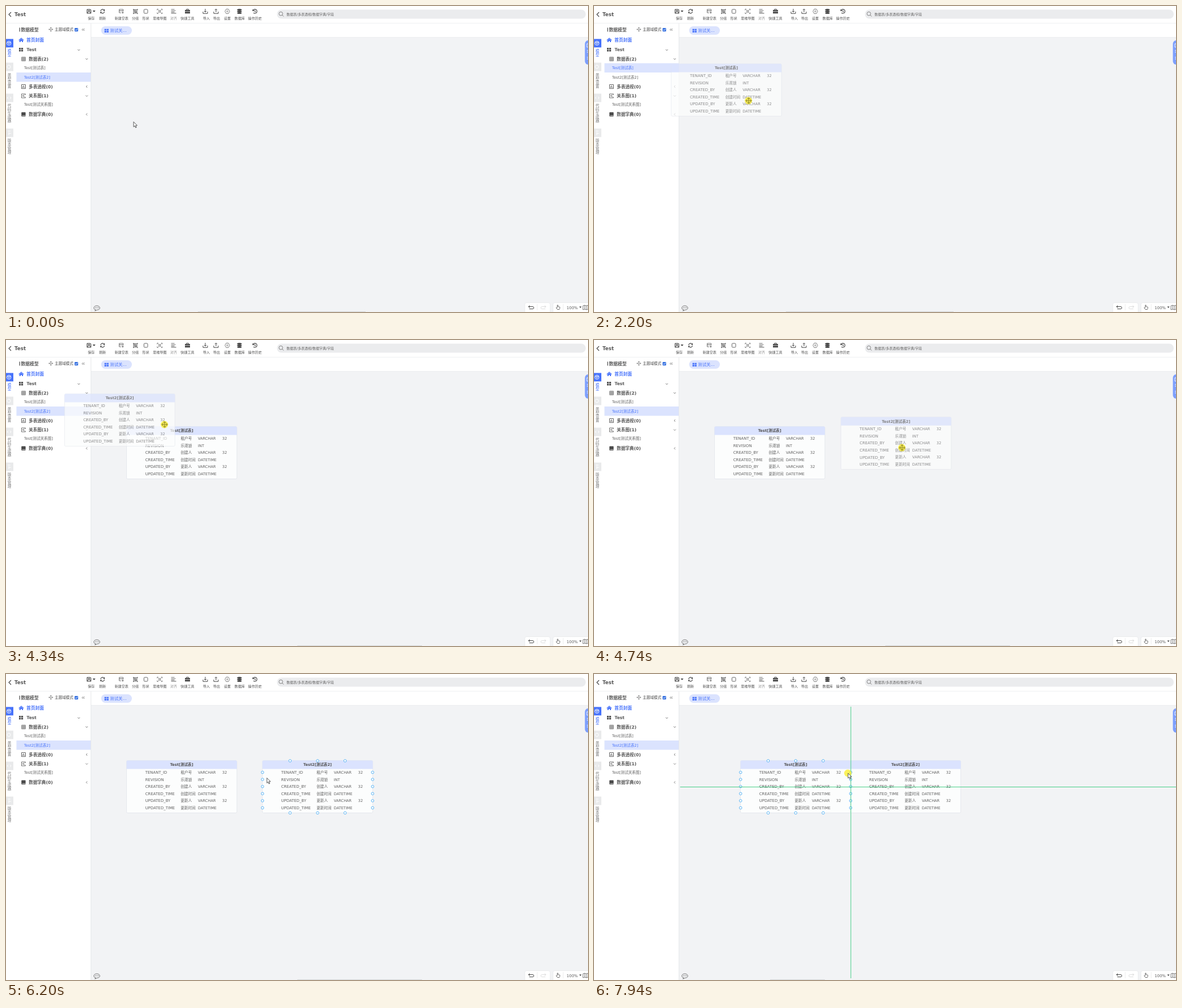
These frames come from a looping animation (1031 px wide and 543 px high, 8 s). An HTML page:

```html
<!DOCTYPE html>
<html lang="zh-CN">
<head>
<meta charset="utf-8">
<title>Data model editor</title>
<style>
html, body { margin: 0; width: 100%; height: 100%; overflow: hidden; background: #fff; }
svg { display: block; width: 100%; height: 100%; }
text { font-family: "DejaVu Sans", "Noto Sans CJK SC", "Noto Sans CJK", sans-serif; white-space: pre; }
</style>
</head>
<body>
<svg id="stage" viewBox="0 0 1031 543"><g id="base"></g><g id="live"></g></svg>
<script>
const BLUE = '#4672fb', DARK = '#484848', MID = '#606060', PALE = '#dbe3fe', CANVAS = '#f2f3f5', GUIDE = '#45cf87';
const LOOP = 8000, STEP = 1000 / 15;

// Drawing helpers; text is centred vertically on cy
const text = (x, cy, s, size = 6.6, fill = MID, more = '') =>
  `<text x="${x}" y="${cy + size * .37}" font-size="${size}" fill="${fill}" ${more}>${s}</text>`;
const bold = (x, cy, s, size = 7.6, fill = '#585858', more = '') => text(x, cy, s, size, fill, 'font-weight="bold" ' + more);
const rect = (x, y, w, h, fill, rx = 0, more = '') =>
  `<rect x="${x}" y="${y}" width="${w}" height="${h}" fill="${fill}" rx="${rx}" ${more}/>`;
const line = (d, stroke = DARK, w = 1) => `<path d="${d}" fill="none" stroke="${stroke}" stroke-width="${w}"/>`;
const fill = (d, color = DARK) => `<path d="${d}" fill="${color}"/>`;
const dot = (x, y, r, color, more = '') => `<circle cx="${x}" cy="${y}" r="${r}" fill="${color}" ${more}/>`;
const at = (x, y, body, more = '') => `<g transform="translate(${x} ${y})" ${more}>${body}</g>`;
const grid = (x, y, c) => [0, 1, 2, 3].map(i => rect(x + i % 2 * 4, y + (i >> 1) * 3.5, 3.2, 2.8, c)).join('');
const chevron = (x, y, down) => line(down ? `M${x - 2} ${y - 1}l2 2 2-2` : `M${x + 1} ${y - 2}l-2 2 2 2`, '#777', .9);
const center = 'text-anchor="middle"';

// Icons are drawn around 0,0
const icon = {
  save: line('M-3.5-3.5h6l1 1v6h-7zM-1.5-3.5v2.5h3v-2.5M-2 3.5v-3h4v3'),
  refresh: line('M-3.5-.5A3.6 3.6 0 0 1 3-2M3.5.5A3.6 3.6 0 0 1-3 2', DARK, 1.2) + fill('M4-4v3.2H.8zM-4 4V.8H-.8z'),
  table: line('M3.5 0v-3.5h-7V2.5H0M-3.5-1h7M1 2.2h3.5M2.8.5v3.5', MID, .9),
  group: line('M-3-3h6v6h-6zM-2-1.6h2.6v2H-2zM-.6.2v1.6h2.6v-2.4H.6', MID, .9) +
    [[-4, -4], [3, -4], [-4, 3], [3, 3]].map(p => rect(...p, 1.6, 1.6, MID)).join(''),
  shape: rect(-3.3, -3.5, 6.6, 7, 'none', 1.3, `stroke="${MID}"`),
  mind: line('M-4.5-2v-2h2M2.5-4h2v2M4.5 2v2h-2M-2.5 4h-2V2M-1.4-1.4h2.8v2.8h-2.8zM-3-3l1.5 1.5M3-3L1.5-1.5M-3 3l1.5-1.5M3 3L1.5 1.5', MID, .8),
  align: line('M-4-3.5h6M-4-1.2h8M-4 1.1h6M-4 3.4h9', '#777', 1.1),
  tools: fill('M-4.5-2.5h9v2.6h-9zM-4.5.8h9v3h-9z') + line('M-1.8-2.5v-1.3h3.6v1.3'),
  load: line('M-4 .5v3.3h8V.5M0-4.5v6M-2-.6L0 1.5 2-.6'),
  send: line('M-4 .5v3.3h8V.5M0 1.5v-5.5M-2-2.2L0-4.2 2-2.2'),
  gear: line('M-2-4h4l2.2 4-2.2 4h-4l-2.2-4z', '#777', .9) + line('M-1.3 0a1.3 1.3 0 1 0 2.6 0a1.3 1.3 0 1 0-2.6 0', '#777', .8),
  data: [-3, 0, 3].map(y => `<ellipse cx="0" cy="${y}" rx="4" ry="1.6" fill="${DARK}"/>`).join('') + rect(-4, -3, 8, .9, DARK) + rect(-4, 0, 8, .9, DARK),
  past: line('M-3-2A3.6 3.6 0 1 1-2.5 2.5M0-2v2.2l1.6 1', DARK, 1.1) + fill('M-4.4-4v3.6h3.6z'),
  move: line('M0-3.5v7M-3.5 0h7', MID, .5) + fill('M0-4l1.5 1.7h-3zM0 4l1.5-1.7h-3zM-4 0l1.7-1.5v3zM4 0l-1.7-1.5v3z', MID)
};
const tools = [
  ['save', 147, '保存', 151], ['refresh', 171, '刷新', 171], ['table', 204, '新建空表', 204.7], ['group', 229, '分组', 229],
  ['shape', 247.7, '形状', 247.5], ['mind', 272.3, '思维导图', 272.5], ['align', 296.5, '对齐', 297], ['tools', 321.5, '快捷工具', 321.5],
  ['load', 353, '导入', 355], ['send', 372, '导出', 373], ['gear', 392, '设置', 392], ['data', 413.5, '数据库', 414], ['past', 441, '操作历史', 441]
];

function header() {
  let s = rect(0, 0, 1031, 30, '#fff') + rect(0, 30, 1031, 1, '#eef0f2');
  s += line('M9 11l-4 4 4 4', DARK, 1.2) + bold(15, 14.5, 'Test', 8.8);
  for (const [name, x, label, lx] of tools)
    s += at(x, 9.5, icon[name]) + text(lx, 21.3, label, 6.1, name == 'align' ? '#888' : '#4c4c4c', center);
  s += fill('M153.5 8h5l-2.5 3z') + rect(480, 6.5, 547, 16, '#ebecee', 8);
  s += line('M483.6 13.7a3.3 3.3 0 1 0 6.6 0a3.3 3.3 0 1 0-6.6 0M489.4 16l2.4 2.6', '#777', .9);
  return s + text(497, 14.5, '数据表/多表透视/数据字典/字段', 6);
}

function rail() {
  const tabs = [[58.5, '模型', 80], [100.5, '类型设置', 122.5], [155.5, '代码生成器', 177], [217.5, '版本管理', 239]];
  const marks = [
    line('M1.5 66a3.7 3.7 0 1 0 7.4 0a3.7 3.7 0 1 0-7.4 0M3 64.5h4.5L5.2 68z', '#fff', .9),
    line('M2 108a3 3 0 1 0 6 0a3 3 0 1 0-6 0', '#fff'),
    line('M4 161l-2 2 2 2M7 161l2 2-2 2', '#fff'),
    line('M3 222h5M5 224v5M5 226h4', '#fff')];
  return tabs.map(([y, label, cy], i) => rect(0, y, 13, 15, i ? '#e9eaeb' : BLUE) + marks[i] +
    [...label].map((c, n) => text(6, cy + n * 6.7, c, 6.6, i ? '#777' : BLUE, center)).join('')).join('');
}

function sidebar() {
  let s = rect(23.6, 38.5, 1.2, 7, DARK) + bold(26.5, 42, '数据模型', 7.8) + at(79.5, 41.5, icon.move);
  s += text(86.3, 41.8, '主题域模式', 6.6, '#4c4c4c') + rect(121.5, 39, 6.2, 6.2, '#3671e0', 1) + line('M122.8 42l1.4 1.5 2.4-3', '#fff', .9);
  s += line('M136.5 40l-1.8 2 1.8 2M139 40l-1.8 2 1.8 2', '#666', .8);
  s += fill('M22.3 60.5l4.7-4.3 4.7 4.3-.8.7-3.9-3.4-3.9 3.4zM23.8 61l3.2-2.8 3.2 2.8v3h-2.2v-2h-2v2h-2.2z', BLUE) + bold(36.3, 60.5, '首页封面', 7.75, BLUE);
  s += grid(23, 74.3, DARK) + bold(36.5, 77.5, 'Test') + chevron(129, 78, true);
  s += line('M27.7 90.8h6.8v6.6h-6.8zM27.7 93h6.8M27.7 95.2h6.8M30 90.8v6.6M32.3 90.8v6.6', MID, .8);
  s += line('M27.5 139.5h7v7h-7zM29.5 145v-2M31 145v-4M32.7 145v-1.5', MID);
  s += line('M34.5 158v-2h-7v7h7v-1.5M29 159.5l4-2M29 159.5l4.5 2', MID, .9);
  s += rect(27.3, 188.5, 7.4, 7.5, DARK, 1) + line('M28.5 194.5h6', '#fff', .7);
  [['数据表(2)', 94, true], ['多表透视(0)', 143, false], ['关系图(1)', 159.5, true], ['数据字典(0)', 192.3, false]]
    .forEach(([label, y, open]) => s += bold(40.3, y, label) + chevron(143, y, open));
  return s + text(32, 175, 'Test[测试关系图]');
}

function workspace() {
  let s = rect(150.5, 55, 881, 488, CANVAS) + rect(150, 31, 1, 512, '#e6e8ea') + rect(151, 55, 880, .6, '#e9ebed');
  s += rect(168.5, 36, 54.5, 15, PALE, 7.5) + grid(174.5, 40.7, BLUE) + text(184.3, 43.5, '测试关...', 7.4, BLUE);
  s += rect(1025.5, 61, 12, 43, '#7d9ffd', 6) + line('M1031 67h-2v6h2M1029 79h2M1029 82h2M1029 91h2M1029 94h2', '#fff', .9);
  s += line('M161 532c-7 0-6.5 7-2 7l-1.5 2 4-1.7c6.5 0 6-7.3-.5-7.3z', MID, .9) + [158.5, 161, 163.5].map(x => dot(x, 535.5, .7, MID)).join('');
  const frame = 'stroke="#e4e6e8" stroke-width=".7"';
  s += rect(919, 526.5, 45, 20, '#fff', 3, frame) + rect(969, 526.5, 70, 20, '#fff', 3, frame);
  s += line('M928 531.5l-2.5 2 2.5 2M925.5 533.5h7.5q2 0 2 2t-2 2h-6') + line('M954 531.5l2.5 2-2.5 2M956.5 533.5h-7q-2 0-2 2t2 2h6', '#ddd');
  s += line('M941 529v11M987 529v11', '#e8e8e8', .8);
  s += line('M976.5 535v-4q.8-1 1.6 0v2.5l3 .8v2.2l-1 2h-3.3l-2.2-3z', MID, .9);
  s += text(993, 535, '100%', 7) + fill('M1015.5 533.3h4l-2 2.6z');
  return s + line('M1022 532l3-1 3 1 3-1v7l-3 1-3-1-3 1zM1025 531v7M1028 532v7', MID, .8);
}

// One entity table with its corner at x,y
const fields = [['TENANT_ID', '租户号', 'VARCHAR', 32], ['REVISION', '乐观锁', 'INT', ''], ['CREATED_BY', '创建人', 'VARCHAR', 32],
  ['CREATED_TIME', '创建时间', 'DATETIME', ''], ['UPDATED_BY', '更新人', 'VARCHAR', 32], ['UPDATED_TIME', '更新时间', 'DATETIME', '']];
const W = 195.5, H = 93, rowY = i => 21 + i * 12.6;

function table(x, y, title, opacity = 1) {
  let s = rect(0, 0, W, H, '#fcfdfd', 2, 'stroke="#e0e4ea" stroke-width=".8"') + fill(`M0 15V2q0-2 2-2h${W - 4}q2 0 2 2v13z`, PALE);
  s += bold(W / 2, 7.5, title, 6.6, '#505050', center);
  fields.forEach((f, i) => s += text(33.3, rowY(i), f[0], 6.9) + text(96, rowY(i), f[1]) +
    text(126.5, rowY(i), f[2]) + text(169.5, rowY(i), f[3]));
  return at(x, y, s, `opacity="${opacity}"`);
}

function ports(x, y) {
  const spots = fields.flatMap((f, i) => [[.2, rowY(i)], [W - .3, rowY(i)]]);
  for (const px of [49, 97.8, 146.5]) spots.push([px, .5], [px, H]);
  return at(x, y, spots.map(p => dot(...p, 2.3, '#fff', 'stroke="#4badf3" stroke-width=".9"')).join(''));
}

// Motion: [step, x, y], 15 steps a second
const pointer = [[0, 226, 205.5], [2, 226, 205.5], [14, 68, 104], [16, 68, 104], [29, 78, 113], [32, 234.5, 149], [33, 274, 168],
  [37, 311, 200], [46, 311, 200], [50, 74, 128], [57, 78, 129], [59, 100, 131], [64, 201.5, 142], [65, 281, 150], [69, 533, 181],
  [70, 545, 190], [79, 552, 199.5], [85, 552, 199.5], [98, 406, 175], [99, 408, 175], [111, 408, 175], [119, 450, 176]];
const ghost1 = [[29, 78, 113], [32, 195, 135], [33, 234.5, 149], [37, 296, 195]];
const ghost2 = [[59, 111, 131], [64, 180, 138], [65, 201.5, 142], [70, 533, 181], [79, 551.7, 200.5]];
const table1 = [[111, 213.5, 153.5], [119, 259.5, 153.5]];
const table2 = [454.2, 153.5];

function pos(keys, k) {
  const n = keys.findIndex(key => key[0] >= k);
  if (n < 1) return keys.at(n).slice(1);
  const a = keys[n - 1], b = keys[n], u = (k - a[0]) / (b[0] - a[0]);
  return [a[1] + (b[1] - a[1]) * u, a[2] + (b[2] - a[2]) * u];
}
const within = (k, ...spans) => spans.some(([a, b]) => k >= a && k < b);
const inside = ([x, y], [bx, by]) => x >= bx && x <= bx + W && y >= by && y <= by + H;

function cursor(k, [x, y], dragging) {
  const pressed = within(k, [17, 42], [57, 86], [105, 106], [110, 120]);
  const halo = pressed ? dot(-.4, 0, 6.5, '#fbee2e', 'opacity=".78"') : '';
  let shape;
  if (dragging) shape = line('M0-5.5l2 2.2h-4zM0 5.5l2-2.2h-4zM-5.5 0l2.2-2v4zM5.5 0l-2.2-2v4zM0-3.3v6.6M-3.3 0h6.6', '#77701c', .8);
  else if (within(k, [99, 112])) shape = line('M0-6v12M-6 0h12', '#4a4a32', 1.3);
  else shape = '<path d="M0 0v9l2.1-1.9 1.5 3.4 1.5-.7-1.5-3.3h2.8z" fill="#fff" stroke="#444" stroke-width=".9"/>';
  return at(x, y, halo + shape);
}

function scene(k) {
  const p = pos(pointer, k), drag1 = within(k, [22, 42]), drag2 = within(k, [59, 86]), dragging = drag1 || drag2;
  const home = pos(table1, k), across = within(k, [73, 86], [112, 120]), down = k >= 118;
  const picked = within(k, [17, 57]) ? 0 : 1;
  let s = '';
  ['Test[测试表]', 'Test2[测试表2]'].forEach((label, i) => {
    const y = 101.5 + i * 16.5, on = picked == i;
    if (on) s += rect(18.5, y, 131.5, 16.5, PALE);
    s += text(32, y + 8.2, label, 6.6, on ? BLUE : MID);
    if (!dragging && p[0] < 150 && p[1] >= y && p[1] < y + 16.5)
      for (let n = 0; n < 8; n++) s += rect(140.5 + n % 2 * 3, y + 4 + (n >> 1) * 2.7, 1.3, 1.3, '#777');
  });
  const [bx, bw] = across ? [312, 97] : k < 42 ? [340, 297] : [516, 221];
  s += rect(bx, 542, bw, 1, '#d3d5d8');
  if (k >= 42) s += table(...home, 'Test[测试表]');
  if (k >= 86) s += table(...table2, 'Test2[测试表2]');
  if (!dragging) {
    if (k >= 42 && inside(p, home)) s += ports(...home);
    else if (k >= 86 && inside(p, table2)) s += ports(...table2);
  }
  if (across) s += line('M152.5 200.5H1031', GUIDE);
  if (down) s += line('M455 58V540', GUIDE);
  if (dragging) {
    const [gx, gy] = pos(drag1 ? ghost1 : ghost2, k);
    s += table(gx - W / 2, gy - H / 2, drag1 ? 'Test[测试表]' : 'Test2[测试表2]', .7);
  }
  return s + cursor(k, p, dragging);
}

const live = document.getElementById('live');
document.getElementById('base').innerHTML = workspace() + header() + rail() + sidebar();
let shown = -1;
function tick() {
  const t = performance.now() % LOOP, k = Math.min(119, Math.floor((t + 14) / STEP));
  if (k != shown) live.innerHTML = scene(shown = k);
  requestAnimationFrame(tick);
}
tick();
</script>
</body>
</html>
```
